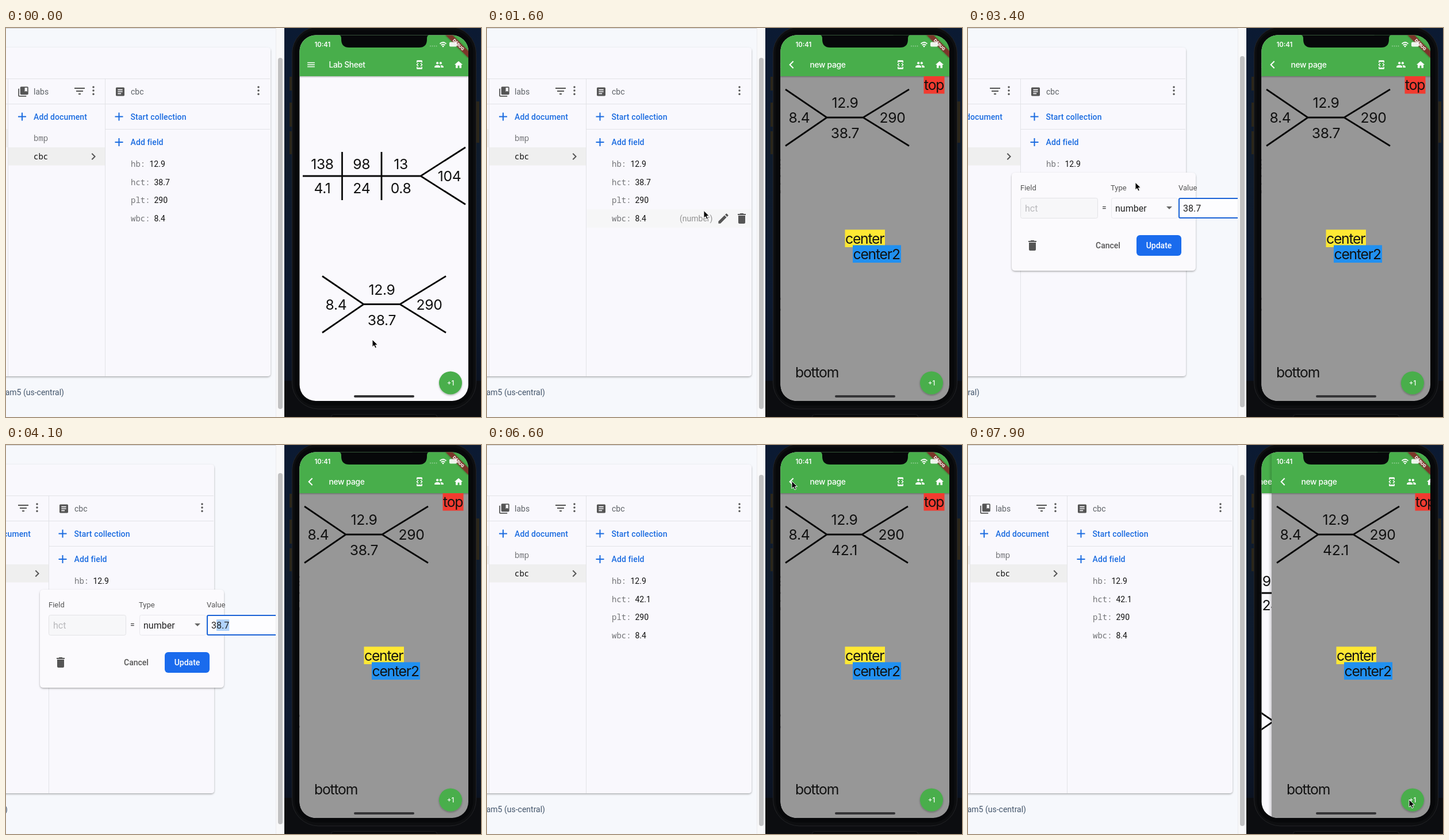
Recreate the animation shown at these times as an HTML page. Size 826 by 678 pixels, loop 8 s.

```html
<!DOCTYPE html>
<html lang="en">
<head>
<meta charset="utf-8">
<title>Lab values</title>
<style>
html, body { margin: 0; width: 100%; height: 100%; overflow: hidden; background: #f6f8fc; }
svg { display: block; width: 826px; height: 678px; }
text { font: 14px Roboto, sans-serif; white-space: pre; }
.mono { font-family: "Roboto Mono", "Noto Sans Mono", monospace; fill: #737477; }
.link { font-weight: 500; fill: #1a6be0; letter-spacing: .1px; }
.grey { fill: #5f6368; }
.label { font-size: 13px; fill: #555; }
.input { font-size: 16px; }
.phone { font-family: Inter, "Noto Sans", sans-serif; }
.num { font-size: 24.7px; letter-spacing: -.3px; text-anchor: middle; fill: #111; }
.word { font-size: 24.7px; letter-spacing: -1.2px; fill: #111; }
.title { font-size: 13.8px; font-weight: 500; letter-spacing: -.3px; fill: #fff; }
.bold { font-weight: 500; }
.mid { text-anchor: middle; }
.end { text-anchor: end; }
.bone { fill: none; stroke: #080808; stroke-width: 2.8; }
</style>
</head>
<body>
<svg id="stage" viewBox="0 0 826 678"></svg>
<script>
const LOOP = 8000, STEP = 100, PAGE = 293;

const ICONS = {
  add: 'M19 13h-6v6h-2v-6H5v-2h6V5h2v6h6v2z',
  filter: 'M10 18h4v-2h-4v2zM3 6v2h18V6H3zm3 7h12v-2H6v2z',
  more: 'M10 5a2 2 0 104 0a2 2 0 10-4 0M10 12a2 2 0 104 0a2 2 0 10-4 0M10 19a2 2 0 104 0a2 2 0 10-4 0',
  next: 'M10 6L8.6 7.4l4.6 4.6-4.6 4.6L10 18l6-6z',
  back: 'M16 4.5L14 2.6 4.6 12 14 21.4l2-1.9L8.5 12z',
  menu: 'M3 18h18v-2H3zM3 13h18v-2H3zM3 6v2h18V6z',
  edit: 'M3 17.25V21h3.75L17.81 9.94l-3.75-3.75zM20.71 7.04c.39-.39.39-1.02 0-1.41l-2.34-2.34c-.39-.39-1.02-.39-1.41 0l-1.83 1.83 3.75 3.75z',
  trash: 'M6 19c0 1.1.9 2 2 2h8c1.1 0 2-.9 2-2V7H6zM19 4h-3.5l-1-1h-5l-1 1H5v2h14z',
  book: 'M4 6H2v14c0 1.1.9 2 2 2h14v-2H4zM20 2H8c-1.1 0-2 .9-2 2v12c0 1.1.9 2 2 2h12c1.1 0 2-.9 2-2V4c0-1.1-.9-2-2-2zm0 10l-2.5-1.5L15 12V4h5z',
  doc: 'M19 3H5c-1.1 0-2 .9-2 2v14c0 1.1.9 2 2 2h14c1.1 0 2-.9 2-2V5c0-1.1-.9-2-2-2zm-5 14H7v-2h7zm3-4H7v-2h10zm0-4H7V7h10z',
  home: 'M10 20v-6h4v6h5v-8h3L12 3 2 12h3v8z',
  people: 'M16 11a3 3 0 100-6a3 3 0 000 6zM8 11a3 3 0 100-6a3 3 0 000 6zM8 13c-2.3 0-7 1.2-7 3.5V19h14v-2.5C15 14.2 10.3 13 8 13zM16 13l-1 .05c1.2.85 2 2 2 3.45V19h6v-2.5c0-2.3-4.7-3.5-7-3.5z',
  dev: 'M7 5h10v2h2V3c0-1.1-.9-2-2-2H7c-1.1 0-2 .9-2 2v4h2zm8.4 11.6L20 12l-4.6-4.6L14 8.8l3.2 3.2-3.2 3.2zM10 15.2L6.8 12 10 8.8 8.6 7.4 4 12l4.6 4.6zM17 19H7v-2H5v4c0 1.1.9 2 2 2h10c1.1 0 2-.9 2-2v-4h-2z'
};

const text = (x, y, s, cls = '', more = '') => `<text x="${x}" y="${y}" class="${cls}" ${more}>${s}</text>`;
const rect = (x, y, w, h, fill, more = '') => `<rect x="${x}" y="${y}" width="${w}" height="${h}" fill="${fill}" ${more}/>`;
const line = (d, color = '#e2e3e7') => `<path d="${d}" fill="none" stroke="${color}"/>`;
const icon = (name, cx, cy, size, fill) =>
  `<path d="${ICONS[name]}" fill="${fill}" transform="translate(${cx - size / 2} ${cy - size / 2}) scale(${size / 24})"/>`;
const num = (x, y, s) => text(x, y, s, 'phone num');

// ---- database console ----
const FIELDS = [['hb', '12.9', 249.5], ['hct', '38.7', 257.5], ['plt', '290', 257.5], ['wbc', '8.4', 257.5]];
const rowY = i => 237 + 31.67 * i;

const fieldRow = ([key, value, x], i) =>
  text(217, rowY(i) + 5, key + ':', 'mono') +
  text(x, rowY(i) + 5, value, '', `id="val-${key}" fill="#111"`);

const plus = (x, y, label) => icon('add', x, y, 24, '#1a6be0') + text(x + 20, y + 5, label, 'link');

const hoverRow = `<g id="hover">
  ${rect(173.5, -16, 286, 32, '#f6f6f7')}
  ${text(335, 5, '(number)', '', 'fill="#929292"')}
  ${icon('edit', 411, 0, 23, '#555')}${icon('trash', 443, 0, 24, '#555')}</g>`;

const editor = `<g id="editor">
  ${rect(157, 252, 320, 171, '#fbfafd', 'rx="6" filter="url(#lift)"')}
  ${text(172, 283, 'Field', 'label')}${text(329, 283, 'Type', 'label')}${text(447, 283, 'Value', 'label')}
  ${rect(172.5, 296.5, 134, 35, '#f7f7f9', 'rx="3" stroke="#e3e3e6"')}
  ${text(180, 319.5, 'hct', 'input', 'fill="#b9b9bc"')}
  ${text(314, 318, '=', '', 'fill="#333"')}
  ${rect(330.5, 296.5, 115, 35, '#fbfafd', 'rx="3" stroke="#e8e8ec"')}
  ${text(337, 319.5, 'number', 'input', 'fill="#222"')}
  <path d="M426 311h10l-5 5z" fill="#666"/>
  ${rect(448, 297, 150, 34, '#fdfdff', 'rx="2" stroke="#1a62d6" stroke-width="2"')}
  <rect id="selection" y="304" height="20" fill="#b1d3fa"/>
  ${text(455, 319.5, '', 'input', 'id="entry" fill="#222"')}
  <rect id="caret" y="304" width="1" height="20" fill="#222"/>
  ${icon('trash', 193, 379, 24, '#555')}
  ${text(303, 384, 'Cancel', 'bold', 'fill="#555"')}
  ${rect(374, 361, 78, 36, '#1a6bed', 'rx="6"')}
  ${text(413, 384, 'Update', 'bold mid', 'fill="#fff"')}</g>`;

const consolePane = `
  ${rect(0, 0, 484, 678, '#f6f8fc')}
  <g clip-path="url(#paneClip)"><g id="scroller">
    ${rect(-40, 34, 500, 573, '#f9f8fd', 'rx="5" filter="url(#lift)"')}
    ${rect(-40, 176, 43, 32, '#f0f0f1')}${rect(4, 208, 168, 31.5, '#efefef')}
    ${line('M-40 88.5H459M-40 132.5H459M173 176.5H459M3.5 88V607M172.5 88V607')}
    ${icon('book', 30, 111, 21, '#555')}${text(48, 116, 'labs', 'grey')}
    ${icon('filter', 128, 110, 24, '#555')}${icon('more', 152, 109, 21, '#555')}
    ${icon('doc', 198.5, 111, 20, '#555')}${text(217, 116, 'cbc', 'grey')}
    ${icon('more', 439, 109, 21, '#555')}
    ${plus(28, 154.5, 'Add document')}${plus(196.5, 154.5, 'Start collection')}${plus(196.5, 199, 'Add field')}
    ${text(48, 197, 'bmp', 'mono')}
    ${text(48, 229, 'cbc', 'mono', 'style="fill:#111"')}${icon('next', 152, 224, 24, '#555')}
    ${hoverRow}${FIELDS.map(fieldRow).join('')}
    ${text(101, 640, 'nam5 (us-central)', 'end', 'fill="#44566c"')}
    ${editor}
  </g></g>
  ${line('M0 .5H470', '#cfd0d3')}
  ${rect(469, 0, 15, 678, '#f8f8f9')}${line('M469.5 0V678', '#ebebed')}
  ${rect(473, 52, 8, 612, '#c1c1c2', 'rx="4" id="thumb"')}`;

// ---- phone ----
function fishbone(x, y, hct, bar) {
  const apex = x + 72, far = apex + bar, cx = apex + bar / 2;
  return `<path class="bone" d="M${x} ${y - 49}L${apex} ${y}L${x} ${y + 49.5}M${apex} ${y}H${far}M${far + 80} ${y - 49}L${far} ${y}L${far + 80} ${y + 49.5}"/>` +
    num(cx, y - 17, '12.9') + num(cx, y + 36, hct) + num(x + 24, y + 9, '8.4') + num(far + 51, y + 9, '290');
}
const bothBones = (x, y, shift) =>
  `<g class="before">${fishbone(x, y, '38.7', 63)}</g><g class="after">${fishbone(x + shift, y, '42.1', 61)}</g>`;

const appBar = (lead, title) => rect(510, 12, 294, 72, '#48ae4b') +
  icon(lead, 530.5, 64, 17, '#fff') + text(561.5, 69, title, 'phone title') +
  ['dev', 'people', 'home'].map((name, i) => icon(name, 719 + 34 * i, 64, 17, '#fff')).join('');

const tag = (x, y, w, fill, word) => rect(x, y, w, 30.5, fill) + text(x + .5, y + 24, word, 'phone word');

const homePage = `<g id="homePage">
  ${rect(510, 12, 294, 638, '#faf9fd')}
  ${rect(510, 84, 294, 3, 'url(#barShade)')}${appBar('menu', 'Lab Sheet')}
  <path class="bone" d="M516 258H721M584.5 216V300M653 216V300M799 208L721 258L799 307.5"/>
  ${['138', '98', '13'].map((s, i) => num(550 + 68.3 * i, 246, s)).join('')}
  ${['4.1', '24', '0.8'].map((s, i) => num(550 + 68.3 * i, 288, s)).join('')}
  ${num(771, 267, '104')}${bothBones(550, 481.5, 1)}</g>`;

const newPage = `<g id="newPage">
  ${rect(504, 12, 6, 638, 'url(#edgeShade)')}
  ${rect(510, 12, 294, 638, '#979797')}
  ${rect(510, 84, 294, 3, 'url(#barShade)')}${appBar('back', 'new page')}
  ${bothBones(519, 156, 0)}
  ${tag(759.5, 84, 36, '#f23b30', 'top')}
  ${tag(622.5, 351.5, 69.5, '#ffe834', 'center')}
  ${tag(636, 378.5, 84, '#2190f0', 'center2')}
  ${text(536, 609, 'bottom', 'phone word')}</g>`;

const statusBar = `
  <g transform="translate(804 12) rotate(45)">${rect(-28.3, 19.8, 56.6, 8.5, '#7b352b', 'filter="url(#soft)"')}
    ${text(0, 26.8, 'DEBUG', 'phone mid', 'fill="#fff" style="font-size:7.2px;font-weight:800"')}</g>
  ${text(536.5, 33, '10:41', 'phone', 'fill="#fff" style="font-size:11.3px;font-weight:600"')}
  ${[738, 741.5, 745, 748.5].map(x => `<circle cx="${x}" cy="31.5" r=".9" fill="#9bd09c"/>`).join('')}
  <path d="M754.5 27.5Q760 22.5 765.5 27.5M756.7 30Q760 27 763.3 30" fill="none" stroke="#fff" stroke-width="1.7"/>
  <path d="M758 31.5Q760 30 762 31.5L760 33.8z" fill="#fff"/>
  ${rect(771, 24.5, 13, 8, '#fff', 'rx="2" opacity=".9"')}
  <path d="M576 11Q583 12 583 18V20Q583 34 597 34H718Q732 34 732 20V18Q732 12 739 11Z" fill="#07080a"/>`;

const phone = `
  ${rect(484, 0, 342, 678, 'url(#night)')}
  ${[[493, 85, 24], [493, 130, 42], [493, 180, 40], [818, 128, 72]].map(([x, y, h]) => rect(x, y, 5, h, '#2b261a')).join('')}
  ${rect(484, 615, 342, 63, '#0c0d10')}
  ${rect(565.5, 673.5, 184, 20, '#08090b', 'rx="4" stroke="#1d1e21"')}
  ${rect(497.5, -2, 320, 666, '#0d0e10', 'rx="46" stroke="#222326"')}
  ${rect(502, 4, 310.5, 654, '#07080a', 'rx="38"')}
  <g clip-path="url(#screenClip)">
    ${homePage}${newPage}
    <circle cx="773" cy="618.5" r="20" fill="#48ae4b" filter="url(#lift)"/>
    ${text(773, 622.5, '+1', 'phone mid bold', 'fill="#fff" style="font-size:11.5px"')}
    ${rect(605, 640, 105, 4, '#343436', 'rx="2"')}
    ${statusBar}
  </g>`;

const shade = (id, x2, y2, stops) => `<linearGradient id="${id}" x2="${x2}" y2="${y2}">${
  stops.map(([at, color, alpha = 1]) => `<stop offset="${at}" stop-color="${color}" stop-opacity="${alpha}"/>`).join('')}</linearGradient>`;

document.getElementById('stage').innerHTML = `<defs>
  <clipPath id="paneClip">${rect(0, 0, 469, 678, '#000')}</clipPath>
  <clipPath id="screenClip">${rect(510.5, 12.5, 293.5, 637.5, '#000', 'rx="28"')}</clipPath>
  <filter id="lift" x="-20%" y="-20%" width="140%" height="140%"><feDropShadow dx="0" dy="1.5" stdDeviation="1.6" flood-opacity=".32"/></filter>
  <filter id="soft" x="-20%" y="-60%" width="140%" height="220%"><feDropShadow dx="0" dy="0" stdDeviation="1.5" flood-opacity=".45"/></filter>
  ${shade('night', 0, 1, [[0, '#0b1a33'], [.3, '#101c2c'], [.7, '#0d1a30'], [.9, '#0b1322'], [1, '#0b0c0f']])}
  ${shade('barShade', 0, 1, [[0, '#000', .25], [1, '#000', 0]])}
  ${shade('edgeShade', 1, 0, [[0, '#000', 0], [1, '#000', .16]])}
</defs>${consolePane}${phone}
<path id="arrow" d="M0 0V13L3 10.3L5 15L7.4 14L5.4 9.4H9.5Z" fill="#000" stroke="#fff" stroke-width="1"/>
<path id="hand" d="M2 1.5Q3.5 0 4.6 2L6.5 6Q8 5 9 6.4Q10.5 5.6 11.3 7.2Q13 6.8 13.4 8.6L14.6 13Q14.8 16 12 17.5H7L1 12Q-.5 10 2.8 10.2L4 11L1.6 4Q1 2.4 2 1.5Z" fill="#fff" stroke="#222" stroke-width="1.1"/>`;

// ---- timeline ----
const POINTER = [
  [0, 637, 543], [600, 771, 617], [1000, 771, 617], [1800, 304, 263], [2300, 304, 263], [2600, 273, 262],
  [3300, 273, 262], [3700, 388, 308], [5200, 388, 308], [5300, 352, 305], [5700, 352, 305],
  [6600, 530, 63], [6900, 530, 63], [7500, 765, 613], [7700, 767, 618], [8000, 767, 618]
];
const SLIDE = [[0, PAGE], [800, 4], [900, 0], [6700, 60], [6800, 255], [6900, 287], [7000, PAGE], [7900, 18]];
const SCROLL = [[0, 0], [3400, 81], [3500, 98], [5300, 0]];
// typed text and number of selected characters at its end
const ENTRY = [
  [0, '38.7', 0], [3900, '38.7', 1], [4000, '38.7', 2], [4100, '38.7', 3], [4400, '38.7', 4],
  [4600, '4', 0], [4800, '42', 0], [4900, '42.', 0], [5100, '42.1', 0]
];

const $ = id => document.getElementById(id);
const show = (el, on) => { el.style.display = on ? '' : 'none'; };
const moveTo = (el, x, y = 0) => el.setAttribute('transform', `translate(${x} ${y})`);
const held = (table, t) => table.findLast(row => row[0] <= t);

function pointerAt(t) {
  const i = POINTER.findIndex(key => key[0] > t);
  const [t0, x0, y0] = POINTER[i - 1], [t1, x1, y1] = POINTER[i];
  const p = (t - t0) / (t1 - t0), e = p * p * (3 - 2 * p);
  return [x0 + (x1 - x0) * e, y0 + (y1 - y0) * e];
}

function drawEntry(t) {
  const [, value, selected] = held(ENTRY, t), entry = $('entry');
  entry.textContent = value;
  const end = 455 + entry.getComputedTextLength();
  const from = selected ? entry.getStartPositionOfChar(value.length - selected).x : end;
  $('selection').setAttribute('x', from);
  $('selection').setAttribute('width', end - from);
  $('caret').setAttribute('x', end);
  show($('caret'), t >= 4600);
}

function draw(t) {
  const editing = t >= 2800 && t < 5300;
  const [x, y] = pointerAt(t);
  const row = Math.floor((y - 221) / 31.67);
  const hovering = !editing && x > 173 && x < 459 && row >= 0 && row < FIELDS.length;
  const pointing = hovering && x < 320;
  const visible = t < 3800 || t >= 5800;

  show($('hover'), hovering);
  if (hovering) moveTo($('hover'), 0, rowY(row));
  show($('editor'), editing);
  if (editing) drawEntry(t);
  const scroll = held(SCROLL, t)[1];
  moveTo($('scroller'), -scroll);
  moveTo($('thumb'), 0, scroll ? -3 : 0);

  $('val-hct').textContent = t >= 5400 ? '42.1' : '38.7';
  document.querySelectorAll('.before').forEach(el => show(el, t < 5500));
  document.querySelectorAll('.after').forEach(el => show(el, t >= 5500));

  const slide = held(SLIDE, t)[1];
  show($('newPage'), slide < PAGE);
  moveTo($('newPage'), slide);
  moveTo($('homePage'), (slide - PAGE) / 3);

  show($('arrow'), visible && !pointing);
  show($('hand'), visible && pointing);
  moveTo($('arrow'), x, y);
  moveTo($('hand'), x, y);
}

const start = performance.now();
function tick() {
  const t = (performance.now() - start) % LOOP;
  draw(Math.floor(t / STEP) * STEP);
  requestAnimationFrame(tick);
}
tick();
</script>
</body>
</html>
```
